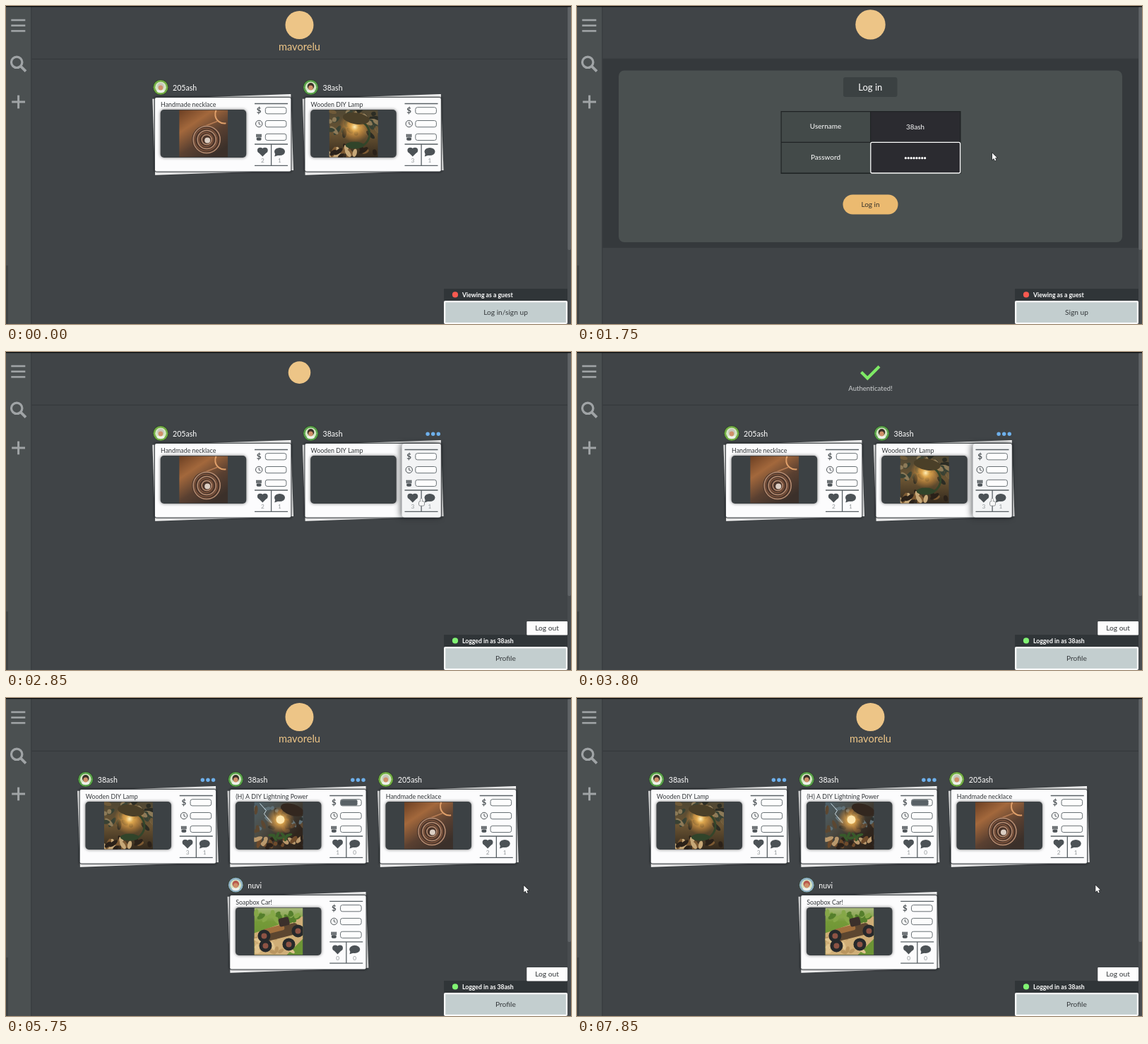
Write an HTML page with a canvas that moves like this. It is 800 px wide and 451 px high and loops after 8000 ms.

```html
<!DOCTYPE html>
<html lang="en">
<head>
<meta charset="utf-8">
<title>Craft feed</title>
<style>
html, body { margin: 0; width: 100%; height: 100%; overflow: hidden; background: #404447; }
canvas { display: block; width: 800px; height: 451px; }
</style>
</head>
<body>
<canvas id="stage"></canvas>
<script>
const LOOP = 8000, W = 800, H = 451, TAU = Math.PI * 2;
const canvas = document.getElementById('stage');
const ratio = window.devicePixelRatio || 1;
canvas.width = W * ratio;
canvas.height = H * ratio;
const c = canvas.getContext('2d');

const BG = '#404447', INK = '#4c5256', GOLD = '#edc587', PALE = '#a0a4a6';
const BRAND = 'mavorelu', ELDER = '205ash', MAKER = '38ash', RACER = 'nuvi';

// Moments of the story, in ms
const OPEN_LOGIN = 600, TYPE = 1400, SUBMIT = 1600, HOME = 2750, REFRESH = 4400;
const TOAST_IN = 3000, TOAST_OUT = 4400, POP = 240;

const clamp = v => Math.max(0, Math.min(1, v));
const ramp = (t, a, b) => clamp((t - a) / (b - a));
const ease = (t, a, b) => { const p = ramp(t, a, b); return p * p * (3 - 2 * p); };
const mix = (a, b, p) => a + (b - a) * p;

function seeded(seed) {
  return () => (seed = seed * 16807 % 2147483647) / 2147483647;
}
function rect(x, y, w, h, fill) {
  c.fillStyle = fill;
  c.fillRect(x, y, w, h);
}
function box(x, y, w, h, r, fill, stroke, lw = 1) {
  c.beginPath();
  c.roundRect(x, y, w, h, r);
  if (fill) { c.fillStyle = fill; c.fill(); }
  if (stroke) { c.strokeStyle = stroke; c.lineWidth = lw; c.stroke(); }
}
function oval(x, y, rx, ry, fill, turn = 0) {
  c.beginPath();
  c.ellipse(x, y, rx, ry, turn, 0, TAU);
  c.fillStyle = fill;
  c.fill();
}
const disc = (x, y, r, fill) => oval(x, y, r, r, fill);
function ring(x, y, r, color, lw, from = 0, to = TAU) {
  c.beginPath();
  c.arc(x, y, r, from, to);
  c.strokeStyle = color;
  c.lineWidth = lw;
  c.stroke();
}
function trace(...pts) {
  c.beginPath();
  for (let i = 0; i < pts.length; i += 2) c.lineTo(pts[i], pts[i + 1]);
}
function poly(fill, ...pts) {
  trace(...pts);
  c.fillStyle = fill;
  c.fill();
}
function line(color, lw, ...pts) {
  trace(...pts);
  c.strokeStyle = color;
  c.lineWidth = lw;
  c.stroke();
}
function text(s, x, y, size, color, align = 'left', weight = 400) {
  c.font = `${weight} ${size}px Lato, "Open Sans", sans-serif`;
  c.textAlign = align;
  c.fillStyle = color;
  c.fillText(s, x, y);
}
function shaded(color, blur, dx, draw) {
  c.save();
  c.shadowColor = color;
  c.shadowBlur = blur * ratio;
  c.shadowOffsetX = dx * ratio;
  draw();
  c.restore();
}
function at(x, y, scale, draw, turn = 0) {
  if (scale < .01) return;
  c.save();
  c.translate(x, y);
  c.rotate(turn);
  c.scale(scale, scale);
  draw();
  c.restore();
}

// Pictures: soft gradient, seeded patches and one simple subject on 69 x 67
const SIZE = 69;
function backdrop(colors, x, y) {
  const g = c.createLinearGradient(0, 0, x, y);
  colors.forEach((col, i) => g.addColorStop(i / (colors.length - 1), col));
  rect(0, 0, SIZE, 67, g);
}
function patches(seed, colors, count, top, bottom, size) {
  const rnd = seeded(seed);
  for (let i = 0; i < count; i++) {
    const col = colors[i % colors.length];
    oval(rnd() * SIZE, mix(top, bottom, rnd()), size * (.4 + rnd()), size * .5, col, rnd() * 3);
  }
}
function glow(x, y, r) {
  const g = c.createRadialGradient(x, y, 0, x, y, r);
  g.addColorStop(0, '#fff0b8');
  g.addColorStop(.25, 'rgba(246,184,84,.85)');
  g.addColorStop(1, 'rgba(230,140,50,0)');
  rect(0, 0, SIZE, 67, g);
}
const pictures = {
  necklace() {
    backdrop(['#6b3f23', '#a3683c', '#5a4031', '#3b302a'], 45, 67);
    ring(64, 6, 13, '#e0a06a', 2, 1.4, 3.6);
    line('#b87d54', 1.5, 54, 16, 28, 26);
    disc(38, 42, 20, '#4a3429');
    for (let r = 7; r < 21; r += 3) ring(38 + r % 2, 42, r, r % 2 ? '#b98f74' : '#7f543c', 1.5);
    disc(40, 43, 4, '#dccfc4');
  },
  lamp() {
    backdrop(['#4f4733', '#6a5433', '#33291d'], 0, 67);
    patches(11, ['#8c7a58', '#2b2c24', '#6f5a39', '#394234'], 46, 0, 36, 6);
    patches(5, ['#c7a878', '#2a2119', '#7d5a33'], 20, 54, 67, 6);
    glow(36, 24, 22);
    ring(38, 34, 19, '#34452a', 3, -1, 1.5);
    oval(38, 12, 19, 8, '#4a3f28', .15);
    oval(36, 50, 13, 5, '#30442a');
  },
  power() {
    backdrop(['#4d616b', '#4b4a42', '#2f251d'], 55, 50);
    patches(23, ['#5f7178', '#2c3130', '#5c4731'], 30, 8, 45, 5);
    patches(8, ['#b9986c', '#2b211a', '#6f4b2b'], 24, 52, 67, 6);
    line('#cfe0e8', 1, 8, 2, 17, 12, 14, 17, 25, 30);
    glow(37, 26, 20);
    oval(54, 11, 17, 8, '#33271f', .3);
    disc(37, 25, 6, '#ffe6ac');
    patches.call(null, 3, ['#3f6a30'], 0, 0, 0, 0);
    for (let i = 0; i < 7; i++) oval(25 + i * 4, 47 + i % 2 * 4, 5, 2, '#385a2b', i);
  },
  car() {
    backdrop(['#a9b97c', '#759a38', '#6c9435'], 0, 40);
    poly('#cfae77', 0, 67, 0, 36, SIZE, 12, SIZE, 44, 46, 67);
    patches(17, ['#b9955f', '#e0c48e'], 18, 40, 64, 5);
    patches(9, ['#86a848', '#557f2c'], 18, 6, 18, 6);
    at(36, 34, 1, () => {
      box(-27, -7, 54, 16, 5, '#5c4630');
      box(-22, -9, 30, 8, 3, '#a06f3d');
      box(2, -18, 15, 12, 3, '#3b302b');
    }, -.25);
    for (const [x, y] of [[14, 40], [16, 54], [49, 52], [62, 33]]) {
      disc(x, y, 9, '#26292b');
      disc(x, y, 4, '#8d5344');
    }
  }
};

const faces = {
  [ELDER]: { rim: '#72ad43', hair: '#c6c3ba' },
  [MAKER]: { rim: '#58a249', hair: '#3a3028' },
  [RACER]: { rim: '#8fb0c4', hair: '#b8584c' }
};
function avatar(x, y, who) {
  const { rim, hair } = faces[who];
  disc(x, y, 11, '#2d3e2b');
  disc(x, y, 10.4, rim);
  disc(x, y, 7.8, '#d6e6c4');
  oval(x, y + 5.4, 5.4, 2.6, '#eef1ea');
  disc(x, y - 1.4, 4.8, hair);
  oval(x, y + .8, 3.3, 3.5, '#cf9068');
}

function heart(x, y) {
  for (const side of [-1, 1]) oval(x + side * 3.3, y - 2.4, 4.1, 3.9, INK);
  poly(INK, x - 7, y - .6, x + 7, y - .6, x, y + 6.6);
}
function bubble(x, y) {
  oval(x, y - .5, 7.5, 5.6, INK);
  poly(INK, x - 6, y + 1, x - 7.2, y + 6.4, x, y + 4);
}
function fist(x, y) {
  for (let i = 0; i < 4; i++) box(x - 4 + i * 2, y - 4.5, 1.6, 5, .7, INK);
  box(x - 3.6, y + .4, 7, 4.4, 2, INK);
}

// One card, in the coordinates of the first place of a two-card row
function card(item, hover, loaded, own) {
  avatar(219, 115.3, item.who);
  text(item.who, 236, 120, 10.6, '#fff');
  if (own && item.who === MAKER) {
    for (let i = 0; i < 3; i++) disc(384.6 + i * 7.6, 116.2, 2.7, '#6eb0ec');
  }
  at(307.2, 182.4, 1, () => rect(-98, -54, 196, 108, '#fafafa'), -.035);
  shaded('rgba(20,24,27,.9)', 3, 0, () => {
    box(211, 130, 192.3, 104.5, 2, '#fcfcfd', BG, 1.6);
  });
  box(211, 130, 192.3, 104.5, 2, '#fcfcfd');
  text(item.title, 219, 143.2, 8.9, '#303437');
  shaded('rgba(0,0,0,.55)', 4, 0, () => box(218.7, 147, 121.5, 68, 5, '#3c4144'));
  if (loaded) at(245.2, 147.5, 1, () => {
    c.beginPath();
    c.rect(0, 0, SIZE, 67);
    c.clip();
    pictures[item.picture]();
  });
  if (hover) {
    shaded('rgba(20,25,28,.65)', 8, -2, () => box(348, 130, 55, 104.5, 4, '#f3f4f5'));
  }

  const x = 358.2;
  text('$', x, 152.2, 11.5, INK, 'center', 700);
  ring(x, 167, 4.7, INK, 1);
  line(INK, 1, x, 164, x, 167.3, x + 2.4, 168.4);
  fist(x, 186);
  for (let i = 0; i < 3; i++) box(367.3, 143.7 + i * 18.8, 29.6, 9.2, 2.8, '#fdfdfd', '#687074');
  if (item.cost) box(367.8, 144.2, 23.5, 8.2, 2, '#596166');
  for (const y of [138.5, 196, 226.3]) line('#596065', 1.3, 352, y, 399, y);
  line('#596065', 1.3, 375.6, 196, 375.6, 226);
  heart(363.3, 207);
  bubble(387.5, 207);
  text(item.likes, 363.3, 222.2, 8.3, '#92979a', 'center');
  text(item.notes, 387.5, 222.2, 8.3, '#92979a', 'center');
}

// wait: how long a picture takes to load
const necklace = { who: ELDER, title: 'Handmade necklace', picture: 'necklace', likes: 2, notes: 1, wait: 50 };
const lamp = { who: MAKER, title: 'Wooden DIY Lamp', picture: 'lamp', likes: 3, notes: 1, wait: 150 };
const power = { who: MAKER, title: '(H) A DIY Lightning Power', picture: 'power', likes: 1, notes: 0, wait: 150, cost: true };
const car = { who: RACER, title: 'Soapbox Car!', picture: 'car', likes: 0, notes: 0, wait: 150 };

function feed(t) {
  const member = t >= HOME;
  const rows = t < REFRESH ? [[necklace, lamp]] : [[lamp, power, necklace], [car]];
  const since = t >= REFRESH ? REFRESH : member ? HOME : -LOOP;
  const tip = cursorAt(t);
  rows.forEach((row, r) => row.forEach((item, i) => {
    const dx = (i - (row.length - 1) / 2) * 212.5 + 106.25, dy = r * 149.9;
    const hover = Math.abs(tip.x - dx - 307) < 96 && Math.abs(tip.y - dy - 182) < 52;
    at(dx, dy, 1, () => card(item, hover, t - since >= item.wait, member));
  }));
}

function loginPage(t) {
  rect(36, 75, 759, 268, '#35393c');
  box(59, 91.5, 713, 243.5, 8, '#4a5050');
  box(377, 101, 76.5, 28, 3, '#3b4142');
  text('Log in', 415.3, 119.7, 13, '#fff', 'center');
  rect(288.5, 149, 255, 89, '#202425');
  ['Username', 'Password'].forEach((label, i) => {
    const y = 150.3 + i * 43.7;
    rect(289.7, y, 125.3, 42.4, '#434a49');
    rect(416.2, y, 126, 42.4, '#2b2b30');
    text(label, 352, y + 23.7, 10, '#fff', 'center');
  });
  const half = (TYPE + SUBMIT) / 2;
  const typed = Math.floor(ramp(t, TYPE, half) * MAKER.length);
  const dots = Math.floor(ramp(t, half, SUBMIT) * 8);
  text(MAKER.slice(0, typed), 479, 175, 9.8, '#fff', 'center');
  for (let i = 0; i < dots; i++) disc(479 + (i - (dots - 1) / 2) * 3.9, 215.7, 1.6, '#fff');
  if (t >= TYPE) box(415.8, t < half ? 149.8 : 193.4, 126.8, 43.6, 2, null, '#fff', 1.3);
  box(376.5, 267.5, 78, 28, 14, '#ebba70');
  text('Log in', 415.5, 285.2, 10, '#35322b', 'center');
}

function header(t) {
  const busy = t >= SUBMIT && t < TOAST_OUT;
  const back = TOAST_OUT + POP;
  const swell = busy ? 1 + .06 * ease(t, SUBMIT, SUBMIT + 150) * (1 - ease(t, HOME - 150, HOME)) : 1;
  const logo = swell * (1 - ease(t, TOAST_IN - POP + 20, TOAST_IN + 20)) + ease(t, back, back + POP + 10);
  at(415.5, 37, logo, () => {
    disc(0, -10, 20, GOLD);
    if (!busy) text(BRAND, 0, 26, 14.6, GOLD, 'center');
  });
  const toast = ease(t, TOAST_IN, TOAST_IN + 200) * (1 - ease(t, TOAST_OUT, back));
  at(415.5, 37, toast, () => {
    line('#7eea65', 4.2, -13, -8.5, -4.2, .2, 12.5, -16.5);
    text('Authenticated!', 0, 18, 9.6, '#d0d3d4', 'center');
  });
}

function sidebar() {
  rect(0, 0, 36, H, '#4b5051');
  rect(35, 0, 1.5, H, '#3a3e41');
  rect(0, 368, 3, 83, '#3d4243');
  for (let i = 0; i < 3; i++) rect(7.3, 18.7 + i * 7.7, 20, 2.6, PALE);
  ring(15.2, 79.8, 7.7, PALE, 3.2);
  line(PALE, 3.8, 20.5, 85.2, 28, 92.6);
  rect(8.2, 134.5, 18.8, 3, PALE);
  rect(16.1, 126.6, 3, 18.8, PALE);
}

function account(t) {
  const member = t >= HOME;
  const label = member ? 'Profile' : t >= OPEN_LOGIN ? 'Sign up' : 'Log in/sign up';
  rect(620, 401, 175, 17, '#303538');
  if (member) {
    box(737.3, 382, 57.7, 19.4, 1, '#fdfdfd');
    text('Log out', 766, 395.4, 10.2, '#313538', 'center');
  }
  disc(636, 409.4, 4.1, member ? '#81f373' : '#f85a50');
  text(member ? 'Logged in as ' + MAKER : 'Viewing as a guest', 646, 412.7, 8.7, '#fff', 'left', 700);
  box(620, 418, 175, 33, 2, '#fbfcfc');
  rect(622.3, 420.3, 170.5, 28.6, '#c3cecf');
  text(label, 707.5, 437.8, 10.2, '#35393c', 'center');
}

// Pointer path: start, end, x, y
const moves = [
  [50, 550, 712, 431], [850, 1250, 588, 208.5], [4050, 4700, 681, 191],
  [4850, 5550, 733.3, 266], [6000, 6450, 734.3, 265.5]
];
function cursorAt(t) {
  let x = 812, y = 330;
  for (const [a, b, nx, ny] of moves) {
    const p = ease(t, a, b);
    x = mix(x, nx, p);
    y = mix(y, ny, p);
  }
  return { x, y };
}
function cursor(t) {
  const { x, y } = cursorAt(t);
  const onButton = x > 620 && x < 795 && y > 418;
  const onCard = t >= HOME && t < 5100;
  at(x, y, 1, () => {
    if (onButton || onCard) {
      box(-1.2, -1, 2.4, 8, 1.2, '#f7f7f7', '#74787a', .8);
      box(-3.5, 3.2, 8, 6.5, 2, '#f7f7f7', '#74787a', .8);
      rect(-.9, 0, 1.8, 6, '#f7f7f7');
    } else {
      trace(0, 0, 0, 9.5, 2.2, 7.5, 3.8, 11, 5.4, 10.2, 3.9, 6.9, 6.8, 6.8);
      c.closePath();
      c.strokeStyle = '#202325';
      c.lineWidth = 1.2;
      c.stroke();
      c.fillStyle = '#fff';
      c.fill();
    }
  });
}

function draw(t) {
  c.setTransform(ratio, 0, 0, ratio, 0, 0);
  rect(0, 0, W, H, BG);
  rect(36, 74.5, 759, 1.5, '#373b3e');
  if (t >= OPEN_LOGIN && t < HOME) loginPage(t);
  else feed(t);
  header(t);
  sidebar();
  rect(795, 0, 5, H, '#484c4f');
  box(795.3, 1, 4.7, 345, 2, '#606467');
  account(t);
  rect(0, 0, W, 1.3, '#090b0c');
  cursor(t);
}

const start = performance.now();
function tick() {
  draw((performance.now() - start) % LOOP);
  requestAnimationFrame(tick);
}
tick();
</script>
</body>
</html>
```
